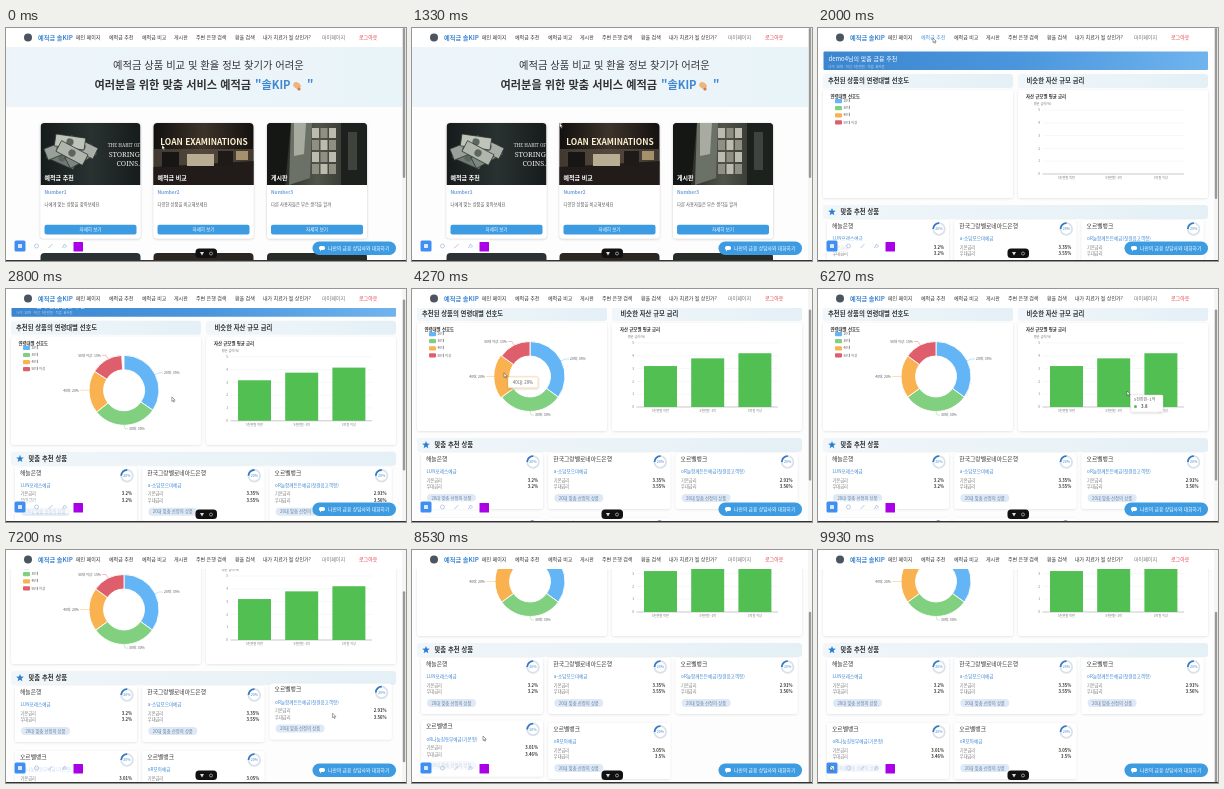
An HTML page for the animation above (10 s loop, 400 by 233 pixels).

```html
<!DOCTYPE html>
<html lang="ko">
<head>
<meta charset="utf-8">
<title>예적금 추천</title>
<style>
  html, body { margin: 0; width: 100%; height: 100%; overflow: hidden; background: #fff; }
  svg { display: block; width: 100vw; height: 100vh; font-family: "Noto Sans CJK KR", "Noto Sans CJK", "Noto Sans", sans-serif; }
</style>
</head>
<body>
<svg id="stage" viewBox="0 0 400 233" preserveAspectRatio="none"></svg>
<script>
const LOOP = 10000, PAGE_AT = 1800, CHART_AT = 2020;
const INK = '#333', GREY = '#777', BLUE = '#3f87d2', BUTTON = '#3d9be2', GREEN = '#52bf52', ICON = '#a9c0e6';
const BRAND = '솔KIP';

// Text is placed by its vertical centre.
const text = (x, y, str, size, fill = INK, attrs = '') =>
  `<text x="${x}" y="${y + size * .36}" font-size="${size}" fill="${fill}" ${attrs}>${str}</text>`;
const rect = (x, y, w, h, fill, r = 0, attrs = '') =>
  `<rect x="${x}" y="${y}" width="${w}" height="${h}" rx="${r}" fill="${fill}" ${attrs}/>`;
const line = (points, stroke, width = .5) =>
  `<polyline points="${points}" fill="none" stroke="${stroke}" stroke-width="${width}"/>`;
const circle = (x, y, r, fill, attrs = '') => `<circle cx="${x}" cy="${y}" r="${r}" fill="${fill}" ${attrs}/>`;
const poly = (points, fill) => `<polygon points="${points}" fill="${fill}"/>`;
const BOLD = 'font-weight="700"', MID = 'text-anchor="middle"', END = 'text-anchor="end"';
const panel = (x, y, w, h, shadow = 'faint') => rect(x, y, w, h, '#fff', 3, `filter="url(#${shadow})"`);

const NAV = [[70, '메인 페이지'], [103, '예적금 추천'], [136, '예적금 비교'], [168, '게시판'], [190, '주변 은행 검색'],
  [229, '환율 검색'], [257, '내가 치료가 될 상인가?'], [316, '마이페이지'], [353, '로그아웃']];
const SLICES = [
  { name: '20대', share: 35, color: '#64b5f6', label: [158, 98], anchor: 'start', lead: '149,100 153,98 157,98' },
  { name: '30대', share: 30, color: '#81d080', label: [123, 154], anchor: 'start', lead: '118,150 119,154 122,154' },
  { name: '40대', share: 20, color: '#f9b24f', label: [73, 115.5], anchor: 'end', lead: '83,115.5 74,115.5' },
  { name: '50대 이상', share: 15, color: '#de5f6b', label: [95, 80.5], anchor: 'end', lead: '102,84 100,80.5 96,80.5' }
];
const BARS = [['5천만원 미만', 3.2], ['5천만원~1억', 3.8], ['1억원 이상', 4.2]];
const DONUT = { x: 118, y: 115.5, inner: 20.5, outer: 35 };
const AXIS = { x: 224.5, y: 146, step: 47.2, unit: 12.8 };
const barX = i => AXIS.x + AXIS.step * i + 7.5;

const OFFERS = [
  ['해늘은행', 'LUN포레스예금', '3.2%', '3.2%'],
  ['한국그랑벨로네아드은행', 'a-소담모으미예금', '3.35%', '3.55%'],
  ['오르벨뱅크', 'oR늘함께든든예금(첫걸음고객형)', '2.91%', '3.56%'],
  ['오르벨뱅크', 'oR나눔길동무예금(기본형)', '3.01%', '3.46%'],
  ['오르벨뱅크', 'oR모아예금', '3.05%', '3.5%']
];
const offerX = i => 9 + (i % 3) * 127.3;
const offerY = i => 192 + Math.floor(i / 3) * 65;

const bill = (x, y, turn, tone) => `<g transform="translate(${x} ${y}) rotate(${turn})">` +
  rect(-15, -6, 30, 12, tone, 0, 'stroke="#2c3431" stroke-width=".7"') + circle(0, 0, 3.6, '#5c6660') + '</g>';

function photo(i) {
  if (i === 0) return rect(34.5, 95, 100, 62, 'url(#steel)') +
    bill(56, 130, 24, '#6f7a74') + bill(75, 128, -28, '#7d8780') + bill(54, 121, -22, '#98a099') +
    bill(76, 119, 26, '#a9afa6') + bill(64, 114, 8, '#bfc3b8') + bill(66, 125, 28, '#b1b6ac') +
    ['THE HABIT OF', 'STORING', 'COINS.'].map((s, k) =>
      text(134, [117, 126, 135.5][k], s, k ? 7.2 : 4.6, '#e8e8e4', `${END} style="font-family:'Noto Serif',serif"`)).join('');
  if (i === 1) return rect(147, 95, 101, 62, 'url(#studio)') + rect(147, 121, 101, 18, '#66594b', 0, 'opacity=".55"') +
    poly('147,139 248,133 248,157 147,157', '#211b19') + rect(156, 124, 17, 15, '#181615') +
    rect(181, 126, 27, 12, '#b9ad94') + rect(212, 123, 15, 15, '#1d1a18') + rect(230, 123, 12, 9, '#a5916c') +
    text(198, 113.5, 'LOAN EXAMINATIONS', 8.4, '#fbf0cf', `${BOLD} ${MID}`);
  return rect(260.5, 95, 101, 62, 'url(#hall)') + poly('260,95 285,95 279,157 260,157', '#141714') +
    poly('285,95 306,95 304,150 283,157', '#6c7167') + poly('288,95 300,95 298,126 288,128', '#a8aca0') +
    [...Array(12).keys()].map(k => rect(306 + k % 3 * 8.5, 100 + Math.floor(k / 3) * 12, 7, 10,
      k % 2 ? '#8f9083' : '#bdbbad')).join('') +
    rect(335, 95, 27, 62, '#1d211d') + rect(342, 104, 9, 38, '#3e433d');
}

function homeCard(i) {
  const x = [34.5, 147.5, 261][i];
  const title = ['예적금 추천', '예적금 비교', '게시판'][i];
  const note = ['나에게 맞는 상품을 찾아보세요', '다양한 상품을 비교해보세요', '다른 사용자들은 무슨 생각을 할까'][i];
  return panel(x, 95, 100, 115.5, 'shadow') + `<g clip-path="url(#photo${i})">${photo(i)}</g>` +
    text(x + 4, 150, title, 6, '#fff', BOLD) + text(x + 4, 164.5, 'Number' + (i + 1), 4.8, '#6f9fdc', BOLD) +
    text(x + 4, 176, note, 4.3, '#555') + rect(x + 4, 196.7, 92, 9.8, BUTTON, 2) +
    text(x + 50, 201.6, '자세히 보기', 4.5, '#fff', MID) +
    rect(x, 225, 100, 20, ['#2b3235', '#2c2520', '#272c27'][i], 4);
}

const home = rect(0, 19, 396, 60, 'url(#hero)') +
  text(107, 37.5, '예적금 상품 비교 및 환율 정보 찾기가 어려운', 10.3, INK) +
  text(88.5, 57, '여러분을 위한 맞춤 서비스 예적금', 11.2, INK, BOLD) +
  text(249, 57, '"' + BRAND, 11.2, BLUE, BOLD) + text(301, 57, '"', 11.2, BLUE, BOLD) +
  '<ellipse cx="291" cy="57.5" rx="4" ry="3" fill="#efb37c" transform="rotate(35 291 57.5)"/>' +
  circle(293, 61, 1.6, '#d9774f') + [0, 1, 2].map(homeCard).join('');

function offer([bank, product, base, best], i) {
  const x = offerX(i), y = offerY(i), right = x + 117;
  const turn = 2 * Math.PI * 5.8;
  return `<g id="offer${i}">` + panel(x, y, 122, 56) + text(x + 5, y + 6, bank, 5.8, INK, 'font-weight="500"') +
    text(x + 5.5, y + 18.5, product, 4.6, BLUE) +
    text(x + 5.5, y + 27, '기본금리', 4.2, GREY) + text(right, y + 27, base, 4.2, INK, `${BOLD} ${END}`) +
    text(x + 5.5, y + 33.7, '우대금리', 4.2, GREY) + text(right, y + 33.7, best, 4.2, INK, `${BOLD} ${END}`) +
    rect(x + 6, y + 41, 49, 8, '#dfe9f5', 4) + text(x + 30.5, y + 45, '20대 맞춤 선정의 상품', 4.3, '#6583a8', MID) +
    circle(x + 112, y + 9, 5.8, 'none', 'stroke="#d9e1e9" stroke-width="1.8"') +
    circle(x + 112, y + 9, 5.8, 'none', `stroke="#3479c4" stroke-width="1.8" stroke-dasharray="${turn * .25} ${turn}" transform="rotate(180 ${x + 112} ${y + 9})"`) +
    text(x + 112, y + 9, '20%', 3.6, BLUE, MID) + '</g>';
}

const heading = (x, y, w, str, indent = 5) => rect(x, y, w, 14, 'url(#heading)', 3) + text(x + indent, y + 7, str, 6.35, INK, BOLD);

const page = rect(5.5, 23.5, 384.5, 18.5, 'url(#banner)', 1) +
  text(10.5, 31, 'demo4님의 맞춤 금융 추천', 6, '#fff', 'font-weight="500"') +
  text(10.5, 38.5, '나이: 20대 · 자산: 5천만원 · 직업: 회사원', 3.3, '#b9d8f5') +
  heading(5, 46, 190, '추천된 상품의 연령대별 선호도') + heading(200, 46, 190, '비슷한 자산 규모 금리', 8.5) +
  panel(5, 62, 190, 108) + panel(200, 62, 190, 108) +
  text(12.5, 68.5, '연령대별 선호도', 4.4, INK, BOLD) +
  SLICES.map((s, i) => rect(17, 71 + i * 7.1, 7, 4.2, s.color, 1) + text(25.5, 73.1 + i * 7.1, s.name, 3.3, '#555')).join('') +
  '<g id="donut"></g>' +
  text(208, 68.5, '자산 규모별 평균 금리', 4.4, INK, BOLD) + text(224.5, 76, '평균 금리(%)', 3.2, GREY, MID) +
  [0, 1, 2, 3, 4, 5].map(v => {
    const y = AXIS.y - v * AXIS.unit;
    return line(`${AXIS.x},${y} 366,${y}`, v ? '#e8eaf0' : '#777', .4) + text(222, y, v, 3.2, GREY, END);
  }).join('') +
  BARS.map(([name], i) => rect(barX(i), AXIS.y, 33, 0, GREEN, 0, `id="bar${i}"`) +
    text(barX(i) + 16.5, 149.7, name, 3.1, GREY, MID)).join('') +
  heading(5, 177, 385, '맞춤 추천 상품', 17.5) +
  poly([...Array(10).keys()].map(k => {
    const r = k % 2 ? 1.7 : 4, a = k * Math.PI / 5;
    return `${14 + r * Math.sin(a)},${184 - r * Math.cos(a)}`;
  }).join(' '), '#2b7fd0') +
  OFFERS.map(offer).join('');

const overlay = rect(396, 0, 4, 233, '#f5f5f5') + '<g id="thumb"></g>' +
  rect(0, 0, 396, 19, '#fff') + circle(22, 9.5, 4, '#4b5560') +
  text(32, 9.5, '예적금 ' + BRAND, 6.2, BLUE, BOLD) +
  NAV.map(([x, s], i) => text(x, 9.5, s, 5, i === 8 ? '#e23b45' : i === 7 ? GREY : INK, `id="nav${i}"`)).join('') +
  rect(7, 211.5, 72, 13, '#fff', 3, 'opacity=".7"') + rect(8.5, 212.5, 11, 11, '#3f8ef0', 1.5) +
  rect(12, 216, 4, 4, '#d6e7ff', .5) + circle(30.5, 218, 2, 'none', `stroke="${ICON}" stroke-width=".8"`) +
  line('42.5,220 46.5,216', ICON, .9) + line('56.5,220 58.5,216 60.5,218 58.5,220', ICON, .9) + rect(67.5, 214, 9.5, 9.5, '#a900e8', .5) +
  rect(189.5, 220.5, 21.5, 9.5, '#111', 3.5) + poly('194,224 198,224 196,227.5', '#ddd') + circle(205, 225.5, 1.5, 'none', 'stroke="#ddd" stroke-width=".6"') +
  rect(306.5, 213.5, 83.5, 13.5, BUTTON, 6.7) + rect(313, 218, 6, 4, '#fff', 1.8) + poly('314,221 316,221 314,223.5', '#fff') +
  text(322, 220, '나만의 금융 상담사와 대화하기', 4.8, '#fff', 'font-weight="500"') +
  rect(0, 232, 400, 1, '#333');

const gradient = (id, ...colors) => `<linearGradient id="${id}">${colors.map((c, i) =>
  `<stop offset="${i / (colors.length - 1)}" stop-color="${c}"/>`).join('')}</linearGradient>`;
const shadow = (id, opacity) => `<filter id="${id}" x="-10%" y="-20%" width="120%" height="150%">
  <feDropShadow dx="0" dy=".6" stdDeviation=".9" flood-opacity="${opacity}"/></filter>`;

const stage = document.getElementById('stage');
stage.innerHTML = `<defs>
  ${shadow('shadow', .22)}${shadow('faint', .12)}
  ${gradient('hero', '#edf5fa', '#e9f4f9')}${gradient('banner', '#3c86cf', '#4a95dc', '#70b4ee')}
  ${gradient('heading', '#f0f6fa', '#e4f0f6')}${gradient('steel', '#141b1a', '#2a3231', '#161b1b')}
  ${gradient('studio', '#12100f', '#3d332a', '#141110')}${gradient('hall', '#161916', '#50544b', '#22261f')}
  ${[34.5, 147.5, 261].map((x, i) => `<clipPath id="photo${i}"><path d="M${x} 157V99q0-4 4-4h92q4 0 4 4v58z"/></clipPath>`).join('')}
  </defs>${rect(0, 0, 400, 233, '#fdfdfe')}
  <g id="home">${home}</g><g id="page">${page}</g>${overlay}<g id="tip"></g>
  <path id="cursor" d="M0 0V4.6L1.1 3.6 1.9 5.3 2.6 5 1.8 3.3H3.3Z" fill="#fff" stroke="#222" stroke-width=".4"/>`;
const el = id => document.getElementById(id);

const clamp = v => Math.max(0, Math.min(1, v));
const smooth = v => v * v * (3 - 2 * v);
const ramp = (t, from, to) => smooth(clamp((t - from) / (to - from)));

const POINTER = [[0, 156, 117], [1200, 156, 117], [1650, 115, 10], [2100, 115, 10], [2600, 170, 110], [3050, 160, 105],
  [3400, 145, 75], [3850, 122, 115], [4230, 92, 84], [4500, 92, 82], [4850, 102, 63], [5470, 250, 95], [5730, 250, 95],
  [6200, 309, 102], [6350, 309, 102], [6650, 342, 110], [6950, 330, 155], [7350, 325, 167], [7900, 205, 150],
  [8450, 71, 186], [9000, 71, 186], [9800, 12, 216], [10000, 12, 216]];
function pointer(t) {
  const k = Math.max(1, POINTER.findIndex(p => p[0] >= t));
  const [t0, x0, y0] = POINTER[k - 1], [t1, x1, y1] = POINTER[k], e = ramp(t, t0, t1);
  return [x0 + (x1 - x0) * e, y0 + (y1 - y0) * e];
}
const scrollAt = t => 28 * (ramp(t, 2700, 2900) + ramp(t, 6880, 7060) + ramp(t, 7700, 7900));

function sector(a, b, inner, outer) {
  const at = (r, angle) => `${DONUT.x + r * Math.sin(angle)} ${DONUT.y - r * Math.cos(angle)}`;
  const big = b - a > Math.PI ? 1 : 0;
  return `M${at(outer, a)}A${outer} ${outer} 0 ${big} 1 ${at(outer, b)}L${at(inner, b)}A${inner} ${inner} 0 ${big} 0 ${at(inner, a)}Z`;
}

// The fixed toolbar at the bottom covers the cards beneath it.
function overOffer(i, t) {
  const [x, y] = pointer(t), px = x - offerX(i), py = y + scrollAt(t) - offerY(i);
  return t > PAGE_AT && y < 211 && px > 0 && px < 122 && py > 0 && py < 56;
}

function tooltip(x, y, w, h, border, body) {
  return rect(x, y, w, h, '#fff', 1, `stroke="${border}" stroke-width=".4" filter="url(#shadow)"`) + body;
}

function render(t) {
  const onPage = t >= PAGE_AT, scroll = scrollAt(t), [mx, my] = pointer(t), py = my + scroll;
  el('home').style.display = onPage ? 'none' : '';
  el('page').style.display = onPage ? '' : 'none';
  el('page').setAttribute('transform', `translate(0 ${-scroll})`);
  el('thumb').innerHTML = rect(396.8, scroll * .735, 2.4, onPage ? 171 : 150, '#999', 1.2);
  el('cursor').setAttribute('transform', `translate(${mx} ${my})`);
  NAV.slice(0, 7).forEach(([x], i) =>
    el('nav' + i).setAttribute('fill', my < 17 && mx >= x && mx < NAV[i + 1][0] - 6 ? '#4b98e0' : INK));

  const grow = 1 - (1 - clamp((t - CHART_AT) / 1000)) ** 3;
  const dx = mx - DONUT.x, dy = py - DONUT.y, radius = Math.hypot(dx, dy);
  const angle = (Math.atan2(dx, -dy) + 2 * Math.PI) % (2 * Math.PI);
  const ready = onPage && grow === 1;
  let tip = '', start = 0, donut = '';
  for (const s of SLICES) {
    const end = start + s.share / 50 * Math.PI;
    const hover = ready && radius > DONUT.inner && radius < DONUT.outer && angle >= start && angle < end;
    if (grow > 0) donut += `<path d="${sector(start * grow, end * grow, DONUT.inner, DONUT.outer + (hover ? 1.2 : 0))}" fill="${s.color}" stroke="#fff" stroke-width=".9" stroke-linejoin="round"/>` +
      `<g opacity="${grow}">${line(s.lead, s.color, .4)}${text(...s.label, `${s.name}: ${s.share}%`, 3.4, '#555', `text-anchor="${s.anchor}"`)}</g>`;
    if (hover) tip = tooltip(mx + 4, my + 4, 30, 11, s.color, text(mx + 19, my + 9.5, `${s.name}: ${s.share}%`, 4.4, '#666', MID));
    start = end;
  }
  el('donut').innerHTML = donut;

  BARS.forEach(([name, value], i) => {
    const h = value * AXIS.unit * grow, left = AXIS.x + i * AXIS.step;
    el('bar' + i).setAttribute('y', AXIS.y - h);
    el('bar' + i).setAttribute('height', h);
    if (ready && py > 82 && py < AXIS.y && mx > left && mx < left + AXIS.step)
      tip = tooltip(mx + 4, my + 4, 32, 17, '#ddd', text(mx + 7, my + 8.5, name, 4, '#666') +
        rect(mx + 7, my + 14, 3, 3, GREEN, 1.5) + text(mx + 14, my + 15.5, value, 4.4, '#555', BOLD));
  });
  el('tip').innerHTML = tip;

  // Averaging recent hover states eases the card up and down.
  OFFERS.forEach((_, i) => {
    const lift = [0, 40, 80, 120, 160].filter(d => overOffer(i, t - d)).length / 5;
    el('offer' + i).setAttribute('transform', `translate(0 ${-2.6 * lift})`);
  });
}

function tick() {
  render(performance.now() % LOOP);
  requestAnimationFrame(tick);
}
tick();
</script>
</body>
</html>
```
